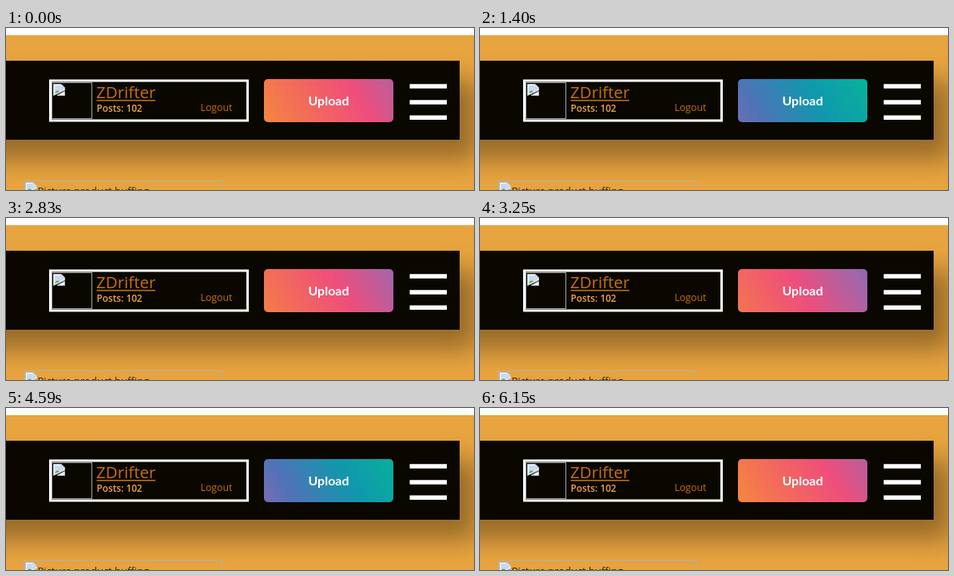
Recreate the animation shown at these times as an HTML page. Size 586 by 203 pixels, loop 6.27 s.

```html
<!DOCTYPE html>
<html lang="en">
<head>
<meta charset="utf-8">
<title>Upload button</title>
<style>
  html, body { margin: 0; width: 100%; height: 100%; overflow: hidden; }
  body { position: relative; background: linear-gradient(#fdfdfd 9px, #e8a43f 9px); }
  svg, .nav, .upload { position: absolute; }
  svg { left: 0; top: 0; }

  .nav {
    left: -80px; top: 41px; width: 648px; height: 99px;
    background: #0a0700;
    box-shadow: 22px 25px 30px rgba(0, 0, 0, .35);
  }

  .upload {
    left: 323px; top: 64px; width: 162px; height: 54px;
    border-radius: 5px;
    background: linear-gradient(60deg, #f79533, #f37055, #ef4e7b, #a166ab,
                                #5073b8, #1098ad, #07b39b, #6fba82);
    background-size: 300% 300%;
    color: #fff;
    font: 700 16px/54px Lato, sans-serif;
    text-align: center;
    animation: hover 6270ms infinite;
  }

  /* Two hovers: each slides the gradient across and back in about a second. */
  @keyframes hover {
    0%, 13.876% { background-position: 0% 50%; animation-timing-function: ease; }
    29.825% { background-position: 100% 50%; }
    34.928% {
      background-position: 100% 50%;
      animation-timing-function: cubic-bezier(.266, .1, .266, 1);
    }
    49.92% { background-position: 0% 50%; animation-timing-function: ease; }
    65.869% { background-position: 100% 50%; }
    70.734% { background-position: 100% 50%; animation-timing-function: ease; }
    86.683%, 100% { background-position: 0% 50%; }
  }

  text { font-family: "Open Sans", sans-serif; }
</style>
</head>
<body>
<div class="nav"></div>
<svg width="586" height="203" viewBox="0 0 586 203">
  <defs>
    <g id="broken">
      <path d="M.5 .5h9.5l4.5 4.5v3l-14 6.5z" fill="#fff" stroke="#b8bcc4"/>
      <path d="M2 2h7v3.5h4v2L2 12z" fill="#c5d9f7"/>
      <path d="M2 12q2-5 5-3l1 .7z" fill="#55a846"/>
      <path d="M10 .5v4.5h4.5z" fill="#eef1f5" stroke="#b8bcc4"/>
      <path d="M5 14.5l9.5-5v5z" fill="#fff" stroke="#b8bcc4"/>
    </g>
  </defs>

  <rect x="55.5" y="66" width="247" height="50" fill="none" stroke="#fff" stroke-width="3"/>
  <rect x="57.5" y="68.5" width="50" height="45" fill="none" stroke="#a5a5a5"/>
  <use href="#broken" x="59" y="70"/>

  <text x="113" y="88" font-size="20.5" fill="#c87209">ZDrifter</text>
  <rect x="113.5" y="90" width="73.5" height="1.5" fill="#c87209"/>
  <text x="113.5" y="105" font-size="11.8" font-weight="600" fill="#efa443">Posts: 102</text>
  <text x="243.5" y="104" font-size="12.3" fill="#c87209">Logout</text>

  <path d="M505.5 73H552M505.5 93H552M505.5 112.3H552" stroke="#fff" stroke-width="5.5"/>

  <rect x="22.5" y="191.5" width="248" height="60" fill="none" stroke="#b9b1a0"/>
  <use href="#broken" x="24" y="193"/>
  <text x="39.5" y="209" font-size="13" fill="#2b1f0c">Picture product buffing</text>
</svg>
<div class="upload">Upload</div>
</body>
</html>
```
